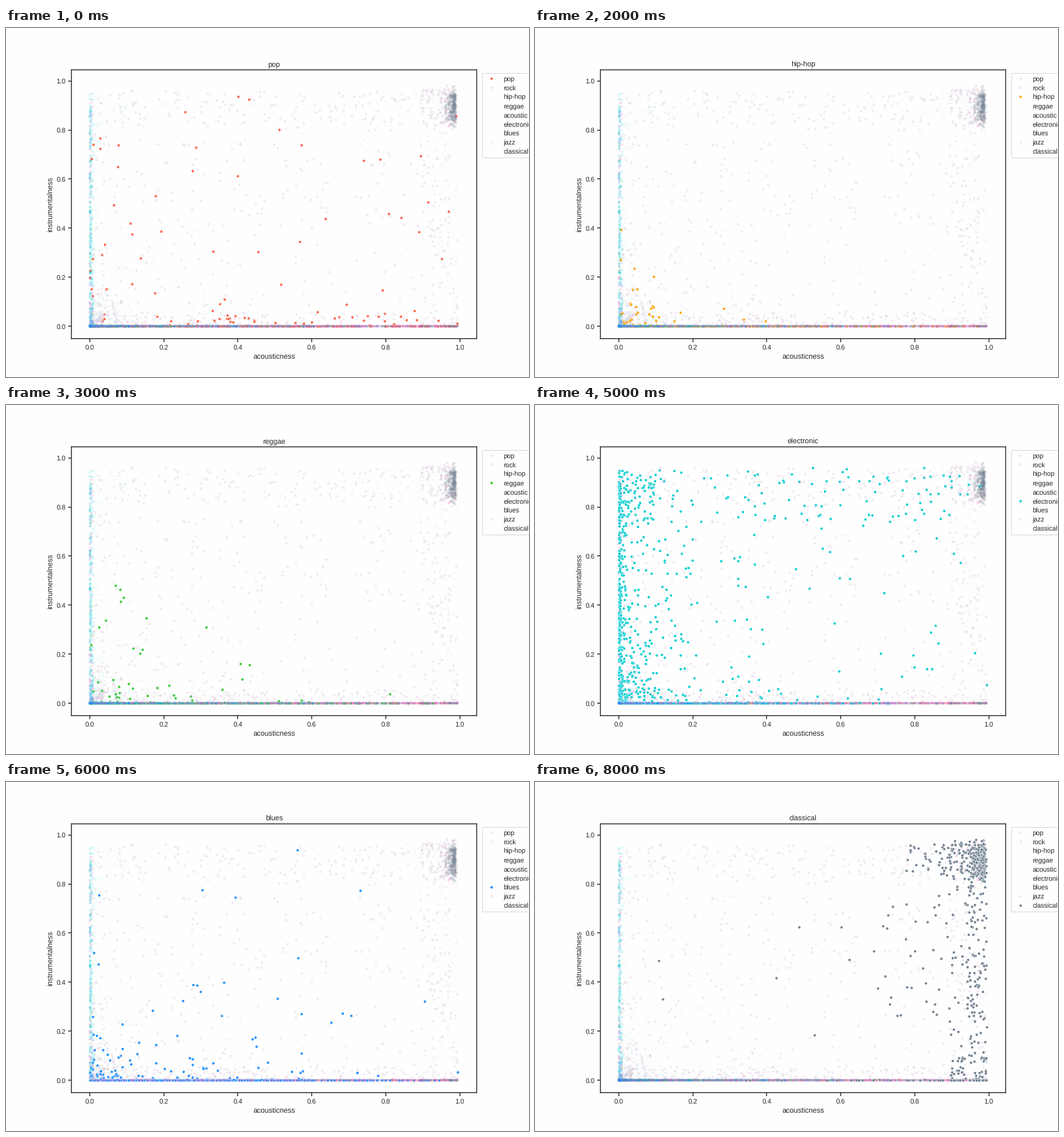
Write a matplotlib script that moves like this. It is 917 px wide and 611 px high and loops after 9 s.

```python
import numpy as np
import matplotlib.pyplot as plt
from matplotlib.animation import FuncAnimation
from matplotlib.colors import to_rgba
from matplotlib.lines import Line2D

W, H, DPI = 917, 611, 64
PT = 76.4 / DPI  # scale of one typographic point
INK = "0.15"
LINE = 1.44 * PT

plt.rcParams.update({
    "font.family": "Liberation Sans", "text.hinting": "none",
    "text.color": INK, "axes.labelcolor": INK, "axes.edgecolor": INK,
    "axes.titlesize": 12 * PT, "axes.labelsize": 12 * PT,
    "legend.fontsize": 11 * PT,
    "axes.linewidth": LINE, "patch.linewidth": PT,
    "axes.titlepad": 6 * PT, "axes.labelpad": 4 * PT,
})

COLORS = {
    "pop": "tomato", "rock": "blueviolet", "hip-hop": "orange",
    "reggae": "limegreen", "acoustic": "orchid", "electronic": "darkturquoise",
    "blues": "dodgerblue", "jazz": "hotpink", "classical": "slategray",
}
NAMES = list(COLORS)
VEILED = {"pop", "rock", "jazz"}  # still readable as pale dots when inactive
DOT, FAINT_DOT = 4.6 * PT, 4.1 * PT

rng = np.random.default_rng(7)


def box(n, x0, x1, y0, y1):
    return np.column_stack([rng.uniform(x0, x1, n), rng.uniform(y0, y1, n)])


def spread(n, x_shape, y_shape):
    """Points over the whole square, with a beta shape on each axis."""
    return np.column_stack([rng.beta(*x_shape, n), rng.beta(*y_shape, n)])


def cloud(n, sx, sy):
    """Points thinning out from the lower left corner."""
    return np.column_stack([rng.exponential(sx, n), rng.exponential(sy, n)])


def wall(n, top, width=0.002):
    """Points lying on zero acousticness."""
    return np.column_stack([rng.exponential(width, n), rng.uniform(0, top, n)])


def floor(n, a, b):
    """Points lying on zero instrumentalness."""
    return np.column_stack([rng.beta(a, b, n), rng.exponential(.0008, n)])


def corner(n):
    """The dense knot in the upper right."""
    return np.column_stack([.995 - rng.exponential(.011, n),
                            .8 + .185 * rng.beta(3, 2, n)])


def join(*parts):
    xy = np.vstack(parts)
    return np.column_stack([.994 * np.clip(xy[:, 0], 0, 1),
                            .98 * np.clip(xy[:, 1], 0, 1)])


DATA = {
    "pop": join(spread(62, (.6, .8), (.7, 1.3)), box(35, 0, 1, 0, .05),
                floor(220, .7, 1.2)),
    "rock": join(spread(55, (.6, 1.1), (.7, 1.2)), wall(32, .9, .001),
                 cloud(70, .03, .06), cloud(60, .3, .03),
                 floor(260, .5, 1.5)),
    "hip-hop": join(cloud(38, .1, .06), floor(260, .7, 1.8)),
    "reggae": join(cloud(30, .16, .2), cloud(20, .15, .02),
                   floor(240, .8, 1.8)),
    "acoustic": join(spread(85, (1, 1), (.4, 1.6)), floor(300, 1.3, .9)),
    "electronic": join(wall(190, .96), wall(90, .96, .02),
                       cloud(130, .05, .14), box(60, 0, .1, .76, .97),
                       box(105, 0, 1, .76, .98), box(60, 0, .2, .1, .76),
                       spread(95, (.9, 1.5), (.8, 1)),
                       cloud(40, .25, .04), floor(240, .6, 1.8)),
    "blues": join(cloud(60, .15, .05), spread(50, (.8, 1.2), (.5, 1.5)),
                  floor(400, .5, 1.3)),
    "jazz": join(box(130, 0, .9, .84, .98), box(90, .9, 1, .83, .99),
                 box(80, .9, 1, 0, .83), box(105, 0, .9, .42, .84),
                 box(48, 0, .9, .1, .42), box(75, 0, 1, 0, .06),
                 wall(18, .95, .004), cloud(15, .08, .05),
                 floor(340, 1, .85)),
    "classical": join(corner(330), box(95, .9, 1, .83, 1),
                      box(38, .78, .9, .84, .99), box(80, .945, 1, .1, .83),
                      box(48, .9, 1, .1, .83), box(36, .7, .9, .24, .78),
                      box(50, .9, 1, 0, .1), spread(10, (1, 1), (1, 2)),
                      floor(75, 4, .6)),
}


def faint(name, veil):
    """Crowded places keep the hue, single dots almost vanish."""
    x, y = DATA[name].T
    single = to_rgba(veil, .3) if name in VEILED else to_rgba(COLORS[name], .03)
    rgba = np.tile(single, (len(x), 1))
    crowded = (y < .006) | (x < .01) | ((x > .96) & (y > .8))
    rgba[crowded] = to_rgba(COLORS[name], .15)
    return rgba


fig = plt.figure(figsize=(W / DPI, H / DPI), dpi=DPI, facecolor="#fefefe")
ax = fig.add_axes([.125, .11, .775, .77], facecolor="#fefefe")
ax.set(xlim=(-.0498, 1.0458), ylim=(-.0498, 1.0447),
       xlabel="acousticness", ylabel="instrumentalness",
       xticks=np.linspace(0, 1, 6), yticks=np.linspace(0, 1, 6))
ax.tick_params(length=6 * PT, width=LINE, pad=3.5 * PT, color=INK,
               labelcolor=INK, labelsize=11 * PT)
for spine in ax.spines.values():
    spine.set_snap(False)
title = ax.set_title("")

layers = {name: ax.scatter(*xy.T) for name, xy in DATA.items()}
proxies = [Line2D([], [], ls="none", marker="o", ms=DOT, mew=.4 * PT,
                  label=name) for name in NAMES]
legend = ax.legend(handles=proxies, loc="upper left", labelspacing=.41,
                   bbox_to_anchor=(1.005, 1), borderaxespad=.5)
legend.get_frame().set_edgecolor("0.8")


def update(i):
    active = NAMES[i]
    title.set_text(active)
    veil = "lightgray" if active == "jazz" else "thistle"
    for name, mark in zip(NAMES, legend.legend_handles):
        layer = layers[name]
        if name == active:
            layer.set(facecolor=COLORS[name], edgecolor="white",
                      linewidth=.5 * PT, sizes=[DOT ** 2])
            mark.set(markerfacecolor=COLORS[name], markeredgecolor="white")
        else:
            layer.set(facecolor=faint(name, veil), edgecolor="none",
                      linewidth=0, sizes=[FAINT_DOT ** 2])
            pale = to_rgba(veil, .33) if name in VEILED else "none"
            mark.set(markerfacecolor=pale, markeredgecolor="none")
    return [title, *layers.values()]


anim = FuncAnimation(fig, update, frames=len(NAMES), interval=1000,
                     repeat=True, repeat_delay=0)
plt.show()
```
